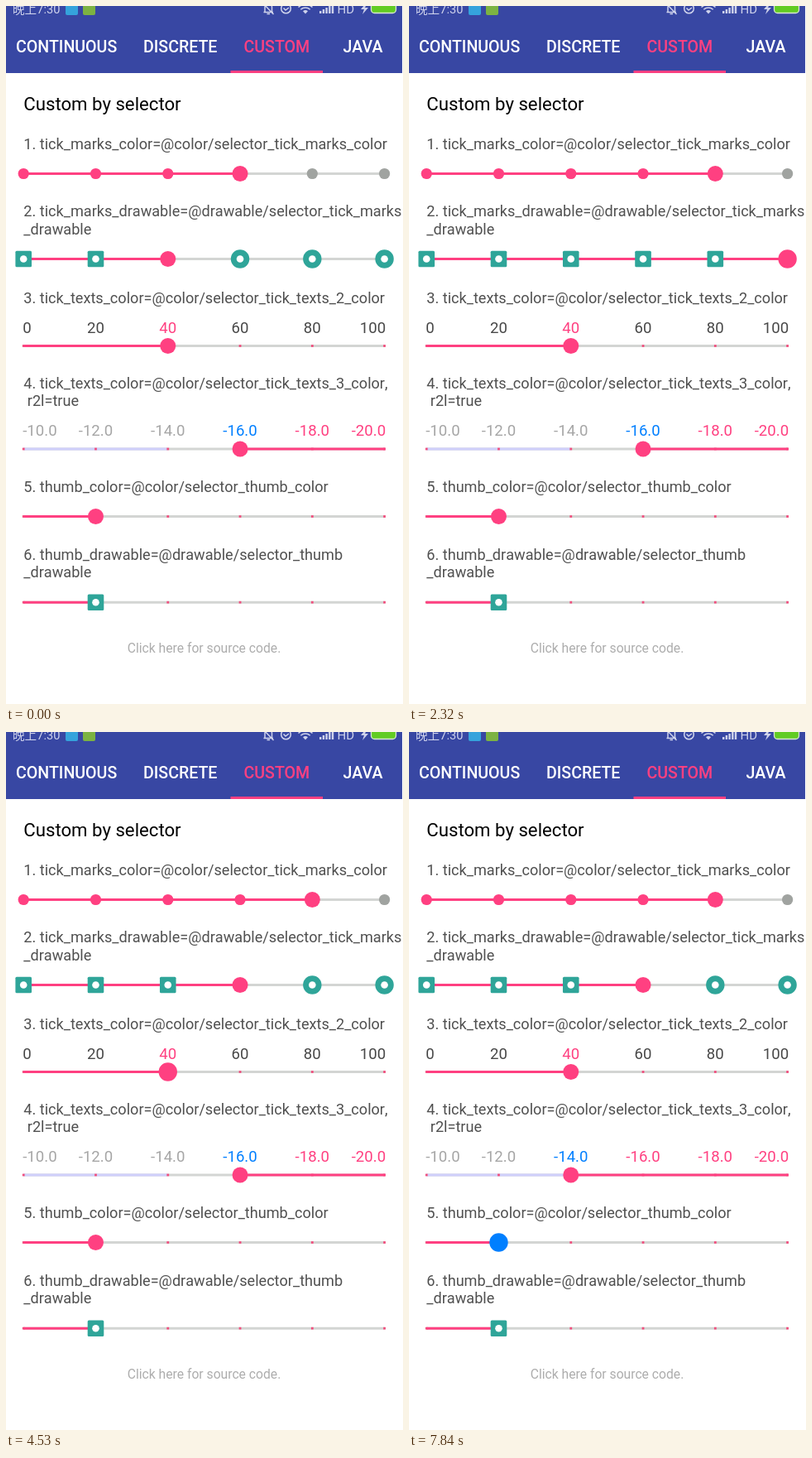
These frames come from a looping animation (480 by 843 pixels, 8000 ms). An HTML page:

```html
<!DOCTYPE html>
<html lang="en">
<head>
<meta charset="utf-8">
<title>Custom by selector</title>
<style>
  html, body { margin: 0; width: 100%; height: 100%; overflow: hidden; background: #fff; }
  svg { display: block; font-family: Roboto, "Noto Sans CJK SC", "Noto Sans CJK", sans-serif; }
  text { white-space: pre; }
  .tabs { font-size: 19.6px; font-weight: 500; fill: #fff; }
  .tabs .on { fill: #ff4081; }
  .status { fill: #cfd3ec; }
  .stroke { fill: none; stroke: #cfd3ec; stroke-width: 1.5; }
  .label { font-size: 18.13px; fill: #505050; font-kerning: none; }
  .tick { font-size: 18.6px; }
</style>
</head>
<body>
<svg width="480" height="843" viewBox="0 0 480 843">
  <rect width="479" height="81" fill="#3847a3"/>

  <g class="status">
    <text x="8" y="9" font-size="14.6">晚上7:30</text>
    <rect x="72" y="-4" width="15" height="15" rx="2" fill="#35a3dc"/>
    <rect x="93" y="-4" width="15" height="15" rx="2" fill="#7cb342"/>
    <text x="400.5" y="9" font-size="15">HD</text>
    <path d="M434 -2l-5 6h4l-2 6 7-8h-4l2-4z"/>
    <path d="M362 9.5l-3 -3.2a4.5 4.5 0 0 1 6 0z"/>
    <path id="wifi" d="M365.5 5.5h5.5l-2.7 4.5z"/>
  </g>
  <g class="stroke">
    <path d="M353.5 1.5a12.5 12.5 0 0 1 17 0M356.3 4.3a8.5 8.5 0 0 1 11.4 0"/>
    <path d="M311.5 7.5H323M313 7V1a4.3 4.3 0 0 1 8.5 0v6M315.5 9.5h3.5M311 -3l12.5 13"/>
    <circle cx="338.5" cy="3" r="5.8"/>
    <path d="M335.5 2.5l2.5 2.5 4 -3"/>
    <path d="M380.2 9V6M383.9 9V4M387.6 9V2M391.3 9V0M395 9V-3" stroke-width="2.4"/>
  </g>
  <rect x="441.5" y="-6" width="30" height="14.5" rx="4" fill="#62cc22" stroke="#d8e6d4" stroke-width="1.3"/>

  <g class="tabs">
    <text x="12" y="56">CONTINUOUS</text>
    <text x="166" y="56">DISCRETE</text>
    <text x="287.5" y="56" class="on">CUSTOM</text>
    <text x="407.5" y="56">JAVA</text>
  </g>
  <rect x="271.5" y="78" width="111.5" height="3" fill="#ff4081"/>

  <text x="21.3" y="126" font-size="22.2">Custom by selector</text>
  <g id="sliders"></g>
  <text x="239.5" y="781" font-size="15.7" fill="#adadad" text-anchor="middle">Click here for source code.</text>
</svg>

<script>
const LOOP = 8000, LEFT = 21.2, GAP = 87.28, LAST = 5, STEP = 97;
const PINK = '#ff4081', BLUE = '#007fff', TEAL = '#2fa599', GREY = '#d3d5d3';
const tickX = i => LEFT + i * GAP;
const END = tickX(LAST);
const root = document.getElementById('sliders');

function set(node, attrs) {
  for (const k in attrs) node.setAttribute(k, attrs[k]);
  return node;
}

function add(parent, tag, attrs = {}) {
  return parent.appendChild(set(document.createElementNS('http://www.w3.org/2000/svg', tag), attrs));
}

const write = (parent, str, attrs) => {
  const node = add(parent, 'text', attrs);
  node.textContent = str;
  return node;
};

const show = (node, on) => set(node, { visibility: on ? 'visible' : 'hidden' });

// A plain badge: teal square or disc with a white dot
function badge(parent, x, y, round) {
  const g = add(parent, 'g');
  if (round) add(g, 'circle', { cx: x, cy: y, r: 11.2, fill: TEAL });
  else add(g, 'rect', { x: x - 9.8, y: y - 9.8, width: 19.6, height: 19.6, rx: 1.5, fill: TEAL });
  add(g, 'circle', { cx: x, cy: y, r: 4.3, fill: '#fff' });
  return g;
}

// Each style builds one tick mark and returns its update(position)
const marks = {
  dot(g, i, y) {
    const dot = add(g, 'circle', { cx: tickX(i), cy: y, r: 6.6 });
    return pos => set(dot, { fill: i <= pos ? PINK : '#a0a3a0' });
  },
  badge(g, i, y) {
    const square = badge(g, tickX(i), y, false), disc = badge(g, tickX(i), y, true);
    return pos => { show(square, i < pos); show(disc, i > pos); };
  },
  small(g, i, y) {
    add(g, 'rect', { x: tickX(i) - 1.4, y: y - 1.4, width: 2.8, height: 2.8, fill: '#f0507f' });
    return () => {};
  }
};

// drag: [arrival time, tick] stops of the finger, pressed from the first stop until release
const sliders = [
  { label: ['1. tick_marks_color=@color/selector_tick_marks_color'],
    y: 202.5, mark: 'dot', rest: 3, release: 1800,
    drag: [[150, 2], [700, 4], [1180, 0], [1470, 4]] },
  { label: ['2. tick_marks_drawable=@drawable/selector_tick_marks', '_drawable'],
    y: 305.5, mark: 'badge', rest: 2, release: 3090,
    drag: [[1800, 3], [2130, 4], [2320, 5], [2510, 1], [2800, 2], [2900, 3]] },
  { label: ['3. tick_texts_color=@color/selector_tick_texts_2_color'],
    y: 410.5, rest: 2, release: 4900,
    text: i => 20 * i,
    textColor: (i, pos) => i === pos ? PINK : '#484848',
    drag: [[3090, 2], [3370, 3], [3650, 4], [3840, 5], [4030, 1], [4320, 4], [4530, 2]] },
  { label: ['4. tick_texts_color=@color/selector_tick_texts_3_color,', ' r2l=true'],
    y: 535, rest: 3, release: 6730, r2l: true,
    text: i => (-10 - 2 * i).toFixed(1),
    textColor: (i, pos) => i === pos ? BLUE : i > pos ? PINK : '#a6a6a6',
    drag: [[5000, 3], [5280, 2], [5470, 1], [5760, 3], [5860, 4], [6150, 2], [6330, 4], [6620, 2]] },
  { label: ['5. thumb_color=@color/selector_thumb_color'],
    y: 616.5, rest: 1, release: LOOP, pressColor: BLUE,
    drag: [[6970, 3], [7470, 4], [7840, 1]] },
  { label: ['6. thumb_drawable=@drawable/selector_thumb', '_drawable'],
    y: 720.2, rest: 1, badgeThumb: true, drag: [] }
];

// The finger rests at each stop, then sweeps in quick steps to reach the next one on time
function position({ rest, drag }, time) {
  let from = rest, since = 0;
  for (const [arrival, to] of drag) {
    if (time < arrival) {
      const steps = Math.min(Math.round(Math.abs(to - from) * 0.7), Math.round((arrival - since) / STEP));
      const left = Math.ceil((arrival - time) / STEP);
      return left >= steps ? from : Math.round(to + (from - to) * left / steps);
    }
    [since, from] = [arrival, to];
  }
  return from;
}

function addLabel(g, { label, y, text }) {
  const bottom = y - 30 - (text ? 21.9 : 0);
  label.forEach((str, i) => write(g, str, {
    class: 'label', x: 21.3, y: Math.round(bottom - 21.4 * (label.length - 1 - i))
  }));
}

function addTickText(g, s, i) {
  const [x, anchor] = i === 0 ? [LEFT - 1, 'start'] : i === LAST ? [END + 1.5, 'end'] : [tickX(i), 'middle'];
  return write(g, s.text(i), { class: 'tick', x, y: Math.round(s.y - 16), 'text-anchor': anchor });
}

function build(s) {
  const g = add(root, 'g'), { y, mark = 'small' } = s;
  const ids = [...Array(LAST + 1).keys()];
  const line = (x2, color) =>
    add(g, 'line', { x1: LEFT, x2, y1: y, y2: y, stroke: color, 'stroke-width': 3 });

  addLabel(g, s);
  line(END, GREY);
  if (s.r2l) line(tickX(2), '#d0d0fb');
  const tickLayer = add(g, 'g');
  const fill = line(END, PINK);
  if (mark !== 'small') g.append(tickLayer);
  const ticks = ids.map(i => marks[mark](tickLayer, i, y));
  const texts = s.text ? ids.map(i => addTickText(g, s, i)) : [];
  const thumb = s.badgeThumb ? badge(g, tickX(s.rest), y, false) : add(g, 'circle', { cy: y });

  return time => {
    const pos = position(s, time), x = tickX(pos);
    const pressed = s.drag.length > 0 && time >= s.drag[0][0] && time < s.release;
    set(fill, s.r2l ? { x1: x, x2: END + 1 } : { x2: x });
    ticks.forEach(update => update(pos));
    texts.forEach((t, i) => set(t, { fill: s.textColor(i, pos) }));
    if (!s.badgeThumb) {
      set(thumb, { cx: x, r: pressed ? 11.2 : 9.5, fill: pressed && s.pressColor || PINK });
    }
  };
}

const updates = sliders.map(build);
const wifi = document.getElementById('wifi');
const start = performance.now();

function render() {
  const time = (performance.now() - start) % LOOP;
  updates.forEach(update => update(time));
  show(wifi, time > 2000 && time < 5760 && time % 2000 >= 900);
  requestAnimationFrame(render);
}
render();
</script>
</body>
</html>
```
